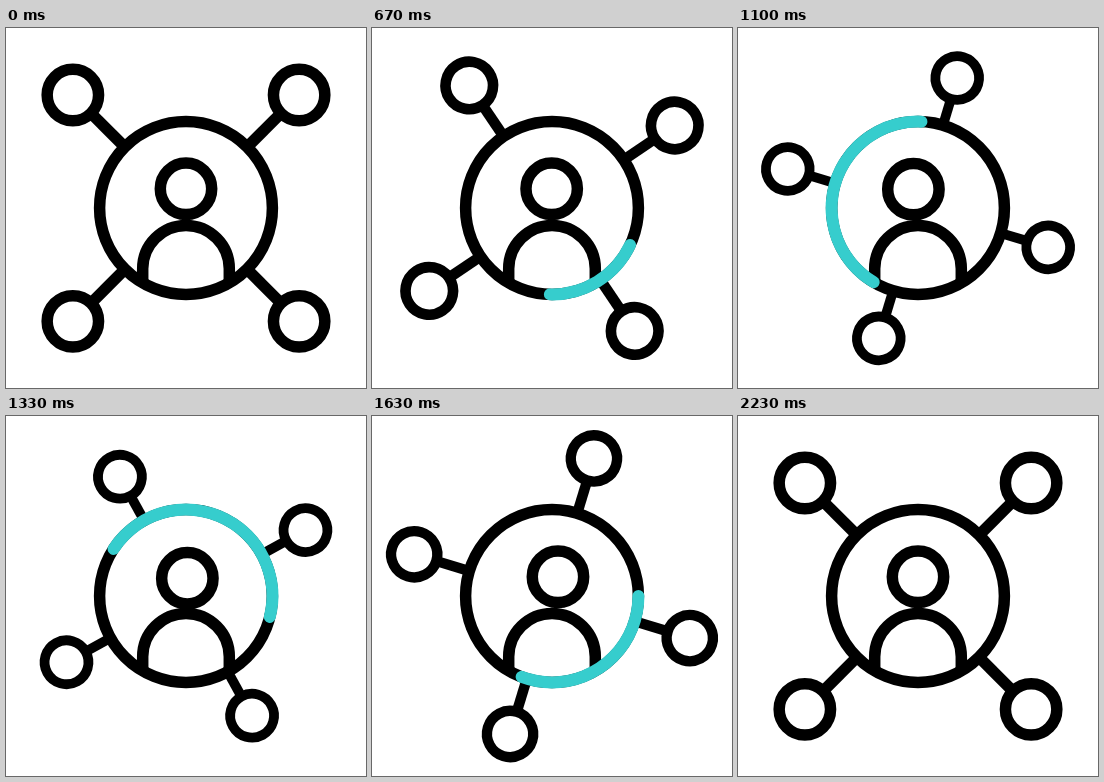
Recreate the animation shown at these times as an HTML page with a canvas. Size 360 by 360 pixels, loop 2500 ms.

```html
<!DOCTYPE html>
<html lang="en">
<head>
<meta charset="utf-8">
<title>Network</title>
<style>
html, body { margin: 0; width: 100%; height: 100%; overflow: hidden; background: #fff; }
canvas { display: block; }
</style>
</head>
<body>
<canvas width="360" height="360"></canvas>
<script>
const ctx = document.querySelector('canvas').getContext('2d');
const LOOP = 2500, START = 262, STEP = 100 / 3, END = 59;
const RING = 86.4, TEAL = '#36cdcd';
const clamp = u => Math.max(0, Math.min(1, u));
const rad = deg => deg * Math.PI / 180;

// cubic-bezier(.53, 0, .47, 1), solved by bisection
function ease(u) {
  u = clamp(u);
  let lo = 0, hi = 1, s;
  for (let i = 0; i < 24; i++) {
    s = (lo + hi) / 2;
    const x = 1.59 * s * (1 - s) ** 2 + 1.41 * s * s * (1 - s) + s ** 3;
    if (x < u) lo = s; else hi = s;
  }
  return s * s * (3 - 2 * s);
}
const span = (n, a, b) => ease((n - a) / (b - a));

// Smooth curve through [step, value] keys, at rest at the last one
function curve(keys, n) {
  const last = keys.length - 1;
  if (n >= keys[last][0]) return keys[last][1];
  const i = Math.max(0, keys.findIndex(k => k[0] > n) - 1);
  const slope = j => {
    if (j === 0 || j === last) return 0;
    const a = keys[j - 1], b = keys[j + 1];
    return (b[1] - a[1]) / (b[0] - a[0]);
  };
  const [x0, y0] = keys[i], [x1, y1] = keys[i + 1];
  const w = x1 - x0, u = clamp((n - x0) / w), v = 1 - u;
  return y0 * v * v * (1 + 2 * u) + y1 * u * u * (3 - 2 * u)
    + w * u * v * (slope(i) * v - slope(i + 1) * u);
}
const TAIL = [[4, 15], [6, 16.5], [18, 49.5], [32, 213], [41, 360], [47, 449], [54, 493]];
const HEAD = [[4, 15], [6, 21.5], [18, 169], [32, 374], [41, 470.6], [47, 489], [54, 493]];

function circle(x, y, r) {
  ctx.beginPath();
  ctx.arc(x, y, r, 0, 2 * Math.PI);
  ctx.stroke();
}

function drawNodes(n) {
  const size = 1 - 0.15 * (span(n, 0, 24) - span(n, 28, END));
  ctx.save();
  ctx.translate(180, 180.2);
  ctx.scale(size, size);
  ctx.rotate(rad(45 + 180 * span(n, 0, END)));
  for (let i = 0; i < 4; i++) {
    ctx.beginPath();
    ctx.moveTo(80, 0);
    ctx.lineTo(134, 0);
    ctx.stroke();
    circle(160, 0, 25.7);
    ctx.rotate(Math.PI / 2);
  }
  ctx.restore();
}

function drawPerson(n) {
  const x = -5.5 * span(n, 10, 20) + 11.5 * span(n, 20, 42) - 6 * span(n, 42, 50);
  const dip = 1.5 * Math.sin(Math.PI * span(n, 20, 42));
  circle(180 + x, 160.8 + dip, 25.7);
  ctx.beginPath();
  ctx.moveTo(136.7, 252);
  ctx.arc(180, 240.8, 43.3, Math.PI, 0);
  ctx.lineTo(223.3, 252);
  ctx.stroke();
}

function drawSweep(n) {
  if (n <= 4 || n >= 54) return;
  ctx.save();
  ctx.strokeStyle = n <= 6 ? '#d2d2d2' : TEAL;
  ctx.lineWidth = 12;
  ctx.lineCap = 'round';
  ctx.beginPath();
  ctx.arc(180, 180, RING, rad(curve(TAIL, n)), rad(curve(HEAD, n)));
  ctx.stroke();
  ctx.restore();
}

function draw(t) {
  const n = Math.max(0, Math.min(END, Math.floor((t % LOOP - START) / STEP)));
  ctx.fillStyle = '#fff';
  ctx.fillRect(0, 0, 360, 360);
  ctx.strokeStyle = '#000';
  ctx.lineWidth = 11.5;
  drawNodes(n);
  ctx.beginPath();
  ctx.arc(180, 180, RING, 0, 2 * Math.PI);
  ctx.fill();
  ctx.stroke();
  drawPerson(n);
  drawSweep(n);
}

const origin = performance.now();
function tick() {
  draw(performance.now() - origin);
  requestAnimationFrame(tick);
}
tick();
</script>
</body>
</html>
```
